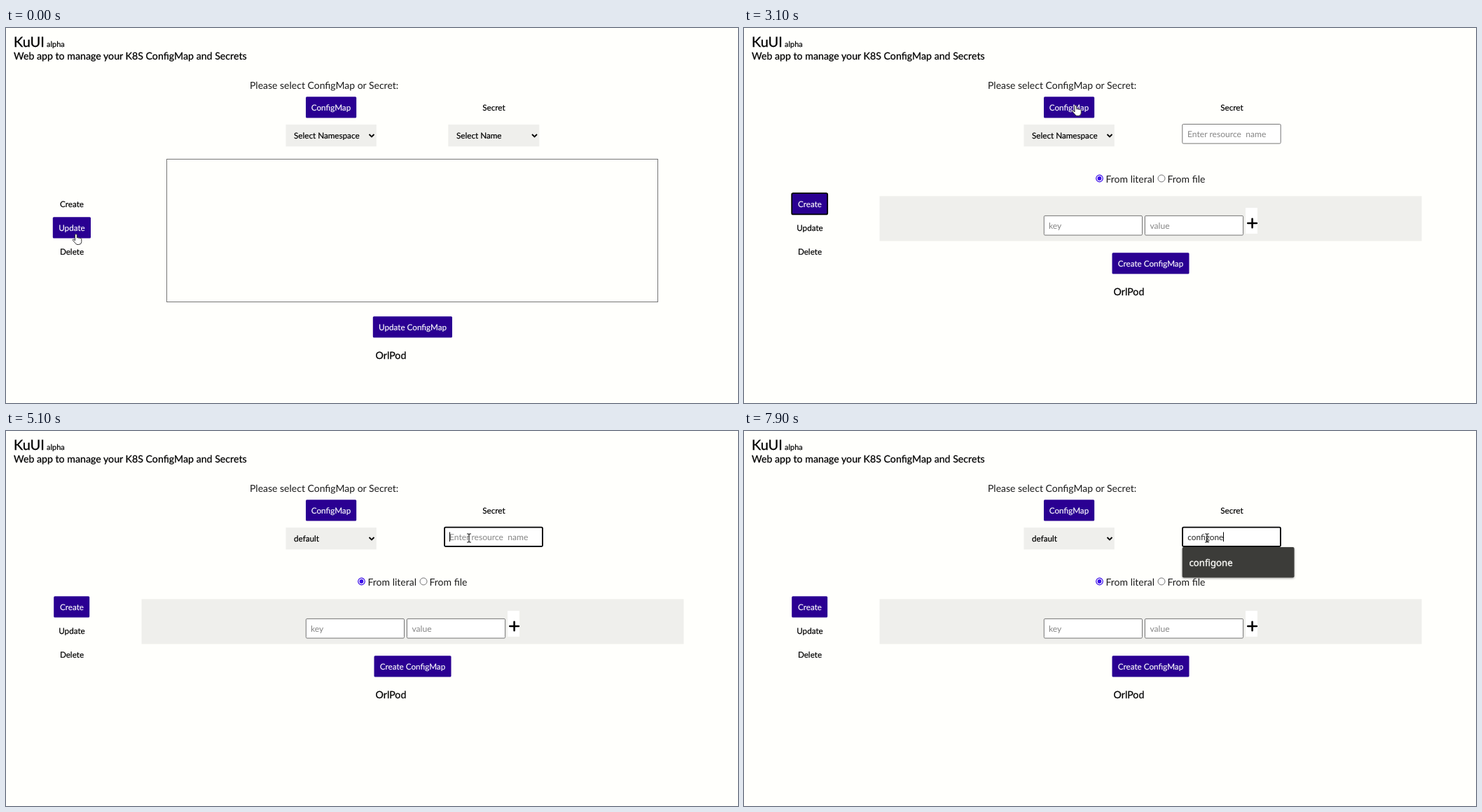
An HTML page for the animation above (8 s loop, 1045 by 536 pixels).

```html
<!DOCTYPE html>
<html lang="en">
<head>
<meta charset="utf-8">
<title>KuUI</title>
<style>
  html, body { margin: 0; width: 100%; height: 100%; overflow: hidden; background: #fffffc; }
  svg { display: block; width: 1045px; height: 536px; }
  text { font: 14px Lato, Inter, sans-serif; fill: #1c1c1c; text-rendering: geometricPrecision; }
  .title { font-size: 20px; fill: #000; stroke: #000; stroke-width: .3px; }
  .alpha { font-size: 11px; fill: #000; stroke: #000; stroke-width: .2px; }
  .strong { font-size: 14.2px; fill: #000; stroke: #000; stroke-width: .25px; }
  .small { font-size: 11.7px; fill: #000; stroke: #000; stroke-width: .2px; }
  .mid { text-anchor: middle; }
  .light { fill: #fff; stroke: #fff; stroke-width: .15px; }
  .hint { font-size: 12.1px; fill: #858585; }
  .typed { font-size: 11.8px; fill: #222; }
  .btn { fill: #2a0092; }
  .gray { fill: #efefec; }
  .box { fill: #fff; stroke: #767676; }
  .ring { fill: none; stroke: #000; stroke-width: 1.75; }
  .chev { fill: none; stroke: #000; stroke-width: 1.8; }
  .menu { fill: #3c3c39; filter: drop-shadow(0 1px 1.5px rgba(0, 0, 0, .4)); }
  .item { font: 500 13.2px "Noto Sans", "Open Sans", sans-serif; fill: #f6f6f3; stroke: #f6f6f3; stroke-width: .4px; }
  .options { fill: #efefec; filter: drop-shadow(1px 1px 2px rgba(0, 0, 0, .4)); }
  .hidden { display: none; }
</style>
</head>
<body>
<svg viewBox="0 0 1045 536">
  <text class="title" x="11" y="26.5">KuUI</text>
  <text class="alpha" x="58" y="27">alpha</text>
  <text class="strong" x="11" y="45">Web app to manage your K8S ConfigMap and Secrets</text>
  <text x="348" y="87">Please select ConfigMap or Secret:</text>

  <rect class="btn" x="428" y="98.3" width="72.2" height="30.2" rx="1.5"/>
  <text class="small mid light" x="464" y="118">ConfigMap</text>
  <text class="small mid" x="696.5" y="118">Secret</text>

  <rect class="gray" x="399.5" y="138" width="129.3" height="31.3"/>
  <text class="small" id="namespace" x="411" y="158"></text>
  <path class="chev" d="M518.5 152l3.5 3.5 3.5-3.5"/>
  <rect class="ring" id="selectRing" x="399.5" y="138" width="129.3" height="31.3" rx="2"/>

  <g id="updatePage">
    <rect class="gray" x="631.3" y="138" width="130" height="31.3"/>
    <text class="small" x="643" y="158">Select Name</text>
    <path class="chev" d="M751 152l3.5 3.5 3.5-3.5"/>
    <rect class="box" x="229.5" y="187.5" width="701" height="204" style="fill:none"/>
    <text class="small mid" x="94" y="256">Create</text>
    <rect class="btn" x="66.8" y="270.3" width="54.2" height="30.2" rx="1.5"/>
    <text class="small mid light" x="94" y="290">Update</text>
    <rect class="btn" x="523.8" y="412.3" width="113.2" height="30.2" rx="1.5"/>
    <text class="small mid light" x="580.5" y="432">Update ConfigMap</text>
    <text class="strong mid" x="549.5" y="472.5">OrlPod</text>
  </g>

  <g id="createPage">
    <rect class="btn" x="68.2" y="236.2" width="51" height="30.2" rx="1.5"/>
    <rect class="ring" id="createRing" x="68.2" y="236.2" width="51" height="30.2" rx="2"/>
    <text class="small mid light" x="94" y="256">Create</text>
    <text class="small mid" x="94" y="290">Update</text>

    <rect class="box" id="nameBox" x="625.8" y="137.5" width="140.4" height="27.6" rx="1.5"/>
    <rect class="ring" id="nameRing" x="626.1" y="137.7" width="139.8" height="27.2" rx="1.5"/>
    <text class="hint" id="nameHint" x="633" y="156">Enter resource&#160; name</text>
    <text class="typed" id="typed" x="633.3" y="156"></text>
    <rect id="caret" y="144.5" width="1" height="13.5"/>

    <circle cx="507.5" cy="215" r="4.8" fill="#fff" stroke="#3a0ce8" stroke-width="1.2"/>
    <circle cx="507.5" cy="215" r="2.9" fill="#3a0ce8"/>
    <text x="516.5" y="220.5">From literal</text>
    <circle class="box" cx="596" cy="215" r="5"/>
    <text x="604.5" y="220.5">From file</text>

    <rect class="gray" x="193.5" y="240.3" width="774" height="64.2"/>
    <rect class="box" x="428.3" y="268.4" width="140.2" height="27.7" rx="1.5"/>
    <text class="hint" x="435" y="287">key</text>
    <rect class="box" x="572.4" y="268.4" width="140.2" height="27.7" rx="1.5"/>
    <text class="hint" x="579.5" y="287">value</text>
    <rect x="716" y="257" width="17" height="37" fill="#fff"/>
    <path d="M719.3 279h12.6M725.6 272.7v12.6" stroke="#000" stroke-width="2.6" stroke-linecap="round"/>
    <rect class="btn" x="525.5" y="321.3" width="110" height="30.2" rx="1.5"/>
    <text class="small mid light" x="580.5" y="341">Create ConfigMap</text>
    <text class="strong mid" x="549.5" y="381.5">OrlPod</text>
  </g>
  <text class="small mid" x="94" y="324">Delete</text>

  <g id="options">
    <rect class="options" x="399.5" y="170" width="129.5" height="77"/>
    <rect id="hover" x="399.5" width="129.5" height="15.4" fill="#c8c8c8"/>
  </g>

  <g id="menu">
    <rect class="menu" id="menuBox" x="625.7" y="166" width="159.8" rx="2"/>
  </g>

  <path id="hand" fill="#fff" stroke="#333" stroke-linejoin="round"
    d="M4 10V2a1.4 1.4 0 0 1 2.8 0V6.2a1.2 1.2 0 0 1 2.3.3a1.2 1.2 0 0 1 2.2.5a1.1 1.1 0 0 1 2 .7V11.5q0 4-4 4H7.5q-2 0-3-2L1 9.6q-.6-1.4.6-1.7q1 0 2.4 2.1z"/>
  <path id="arrow" fill="#2b2b2b" stroke="#fff" stroke-width=".8"
    d="M0 0V13L2.9 10.3 4.8 14.6 7 13.6 5.1 9.4H9z"/>
  <path id="beam" fill="none" stroke="#222" stroke-width="1.2"
    d="M-3-6h2l1 1 1-1h2M0-5V5M-3 6h2l1-1 1 1h2"/>
</svg>
<script>
  const LOOP = 8000;
  const $ = id => document.getElementById(id);
  const show = (id, on) => $(id).classList.toggle('hidden', !on);

  // [start ms, pointer, x, y]
  const pointer = [
    [0, 'hand', 94.5, 294],
    [500, 'hand', 92, 295], [600, 'hand', 85, 290], [700, 'hand', 80, 280], [800, 'hand', 98, 273],
    [1000, 'hand', 84, 262], [1100, 'hand', 77, 255],
    [1300, 'hand', 91, 252], [1400, 'hand', 90, 250],
    [2600, 'hand', 286, 200], [2700, 'hand', 465, 145],
    [2900, 'hand', 474, 130], [3000, 'hand', 472, 115], [3100, 'hand', 468, 110],
    [3200, 'hand', 476, 120], [3300, 'hand', 470, 139], [3500, 'hand', 458, 146],
    [3900, 'arrow', 463, 149], [4100, 'arrow', 468, 162], [4200, 'arrow', 466, 182], [4300, 'arrow', 463.5, 197],
    [4700, 'arrow', 520, 185], [4800, 'arrow', 605, 168], [4900, 'beam', 661, 153]
  ];

  // [start ms, number of letters]
  const typing = [[0, 0], [6200, 2], [6300, 3], [6400, 4], [6500, 5], [6600, 6], [7700, 7], [7800, 8], [7900, 9]];

  const at = (steps, t) => steps.findLast(step => step[0] <= t);
  const within = (t, from, to = LOOP) => t >= from && t < to;

  function addText(parent, cls, x, y, words) {
    const el = document.createElementNS('http://www.w3.org/2000/svg', 'text');
    el.setAttribute('class', cls);
    el.setAttribute('x', x);
    el.setAttribute('y', y);
    el.textContent = words;
    return $(parent).appendChild(el);
  }

  ['Select Namespace', 'default', 'kube-node-lease', 'kube-public', 'kube-system']
    .forEach((name, i) => addText('options', 'small', 411, 181.5 + i * 15.4, name));
  const items = ['cmone', 'secretone', 'sfsdf', 'cmond', 'kconfig', 'cfile']
    .map((name, i) => addText('menu', 'item', 635.5, 193 + i * 30, name));

  function draw(t) {
    const create = t >= 2200;
    show('updatePage', !create);
    show('createPage', create);
    show('createRing', t < 3900);

    show('options', within(t, 3900, 4600));
    $('hover').setAttribute('y', t < 4200 ? 170 : 185.4);
    $('namespace').textContent = t < 4600 ? 'Select Namespace' : 'default';
    show('selectRing', within(t, 4600, 5100));

    $('nameBox').style.stroke = t < 4900 ? '' : '#4f4f4f';
    show('nameRing', t >= 5100);
    const letters = at(typing, t)[1];
    show('nameHint', !letters);
    $('typed').textContent = 'configone'.slice(0, letters);
    $('caret').setAttribute('x', 633 + (letters ? $('typed').getComputedTextLength() : 0));
    show('caret', within(t, 5100, 5700) || within(t, 6200, 7200) || t >= 7700);

    show('menu', t >= 5400);
    $('menuBox').setAttribute('height', letters ? 43.5 : 193.5);
    items[0].textContent = letters ? 'configone' : 'cmone';
    items.slice(1).forEach(item => item.classList.toggle('hidden', letters > 0));

    const [, kind, x, y] = at(pointer, t);
    for (const id of ['hand', 'arrow', 'beam']) show(id, id === kind);
    $(kind).setAttribute('transform', `translate(${x} ${y})`);
  }

  function tick(now) {
    draw(now % LOOP);
    requestAnimationFrame(tick);
  }
  draw(0);
  requestAnimationFrame(tick);
</script>
</body>
</html>
```
